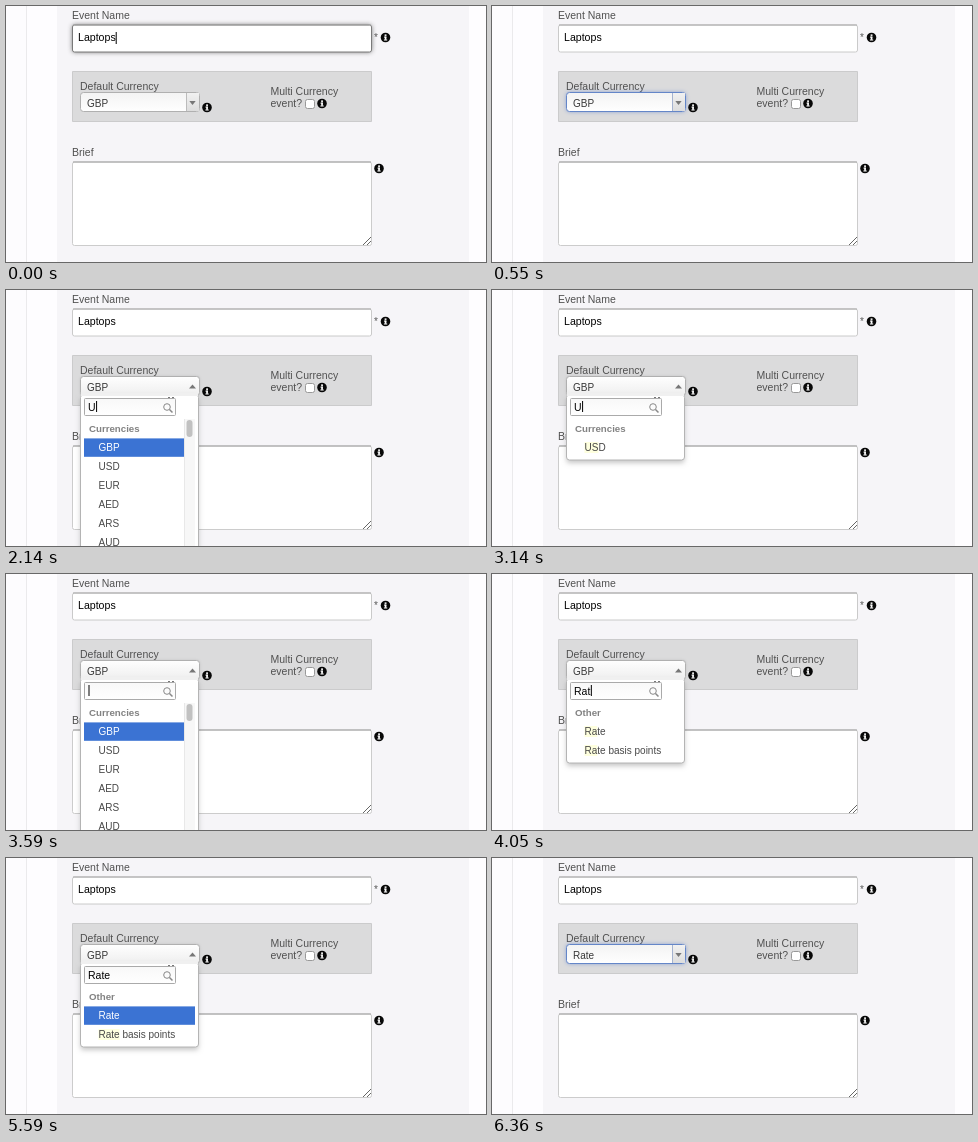
An HTML page with a canvas for the animation above (6.99 s loop, 480 by 256 pixels).

```html
<!DOCTYPE html>
<html lang="en">
<head>
<meta charset="utf-8">
<title>Currency picker</title>
<style>
  html, body { margin: 0; width: 100%; height: 100%; overflow: hidden; background: #fff; }
  canvas { display: block; width: 480px; height: 256px; }
</style>
</head>
<body>
<canvas id="stage"></canvas>
<script>
const LOOP = 6990, BLUR = 50, FADE = 250, OPEN = 590, PICK = 5200, CLOSE = 5690;
const BLINK = 540, CARET_REST = 4770, FILTER_DELAY = 45;
const FONT = '"Liberation Sans", Arial, sans-serif';

// Search box contents over time
const typing = [
  [OPEN, ''], [2140, 'U'], [2270, 'US'], [2400, 'USD'],
  [2910, 'US'], [3130, 'U'], [3320, ''],
  [3680, 'R'], [3860, 'Ra'], [4040, 'Rat'], [4230, 'Rate']
];
const groups = [
  ['Currencies', ['GBP', 'USD', 'EUR', 'AED', 'ARS', 'AUD', 'BGN', 'BRL', 'CAD', 'CHF', 'HUF', 'RUB', 'ZAR']],
  ['Other', ['Rate', 'Rate basis points']]
];

const canvas = document.getElementById('stage');
const ctx = canvas.getContext('2d');
const scale = window.devicePixelRatio || 1;
canvas.width = 480 * scale;
canvas.height = 256 * scale;

const typedAt = t => typing.filter(([at]) => at <= t).pop() || typing[0];

function rect(x, y, w, h, color) {
  ctx.fillStyle = color;
  ctx.fillRect(x, y, w, h);
}

function box(x, y, w, h, fill, border, radius = 2) {
  ctx.beginPath();
  ctx.roundRect(x + .5, y + .5, w - 1, h - 1, radius);
  ctx.fillStyle = fill;
  ctx.fill();
  ctx.shadowColor = 'transparent';
  ctx.strokeStyle = border;
  ctx.lineWidth = 1;
  ctx.stroke();
}

function glow(color, blur, dy = 0) {
  ctx.shadowColor = color;
  ctx.shadowBlur = blur * scale;
  ctx.shadowOffsetY = dy * scale;
}

function text(str, x, y, size = 10.5, color = '#505050', weight = '') {
  ctx.font = `${weight} ${size}px ${FONT}`;
  ctx.fillStyle = color;
  ctx.fillText(str, x, y);
  return ctx.measureText(str).width;
}

function polygon(points, color) {
  ctx.beginPath();
  points.forEach(([x, y]) => ctx.lineTo(x, y));
  ctx.fillStyle = color;
  ctx.fill();
}

function line(x1, y1, x2, y2, color, width = 1) {
  ctx.beginPath();
  ctx.moveTo(x1, y1);
  ctx.lineTo(x2, y2);
  ctx.strokeStyle = color;
  ctx.lineWidth = width;
  ctx.stroke();
}

function gradient(y, h, top, bottom) {
  const g = ctx.createLinearGradient(0, y, 0, y + h);
  g.addColorStop(0, top);
  g.addColorStop(1, bottom);
  return g;
}

function info(x, y) {
  ctx.beginPath();
  ctx.arc(x, y, 4.8, 0, 7);
  ctx.fillStyle = '#080808';
  ctx.fill();
  rect(x - .9, y - 3.1, 1.9, 1.5, '#fff');
  rect(x - 1.5, y - .9, 2.4, 1, '#fff');
  rect(x - .8, y - .9, 1.7, 3.2, '#fff');
  rect(x - 1.6, y + 2, 3.3, 1, '#fff');
}

function form(t) {
  rect(0, 0, 480, 256, '#fefdff');
  rect(0, 0, 20, 256, '#fdfcfe');
  rect(20, 0, 1, 256, '#ebeaec');
  rect(51, 0, 412, 256, '#f6f5f8');

  const focus = 1 - Math.min(1, Math.max(0, (t - BLUR) / FADE));
  const shade = Math.round(202 - 80 * focus);
  text('Event Name', 66, 13);
  glow(`rgba(60,60,60,${.75 * focus})`, 5);
  box(66, 18.5, 300, 28, '#fff', `rgb(${shade},${shade},${shade})`);
  rect(67, 18.5, 298, 1, '#a8a8a8');
  const width = text('Laptops', 72, 35, 10.6, '#000');
  if (t < BLUR) rect(72 + width, 26, 1, 12, '#000');
  text('*', 368, 35, 10, '#555');
  info(379.5, 31.5);

  box(66, 65, 300, 51, '#dbdbdc', '#cbcbcc', 0);
  text('Default Currency', 74, 84);
  text('Multi Currency', 264.5, 88.5);
  text('event?', 264.5, 101);
  box(299, 93, 10, 10, '#fff', '#999');
  info(316, 97.5);
  info(201, 101.5);

  text('Brief', 66, 150);
  box(66, 155.5, 300, 84.5, '#fff', '#ccc');
  rect(67, 155.5, 298, 1, '#a0a0a0');
  line(357, 239, 365, 231, '#666');
  line(361, 239, 365, 235, '#666');
  info(373, 162.5);
}

function select(t, open) {
  const focused = t >= BLUR && !open;
  if (focused) glow('rgba(70,110,200,.6)', 4);
  else if (open) glow('rgba(0,0,0,.15)', 3);
  box(74, 86, 120, 20, open ? gradient(86, 20, '#fff', '#eee') : gradient(86, 20, '#f3f3f3', '#fff'),
      focused ? '#6486c8' : '#b0b0b0', 3);
  text(t < CLOSE ? 'GBP' : 'Rate', 81, 101, 10, '#383838');
  if (open) {
    polygon([[183, 98.5], [190, 98.5], [186.5, 94.5]], '#777');
  } else {
    rect(181, 87, 12, 18, gradient(87, 18, '#f1f1f1', '#ddd'));
    rect(180, 87, 1, 18, focused ? '#a4b2cf' : '#bbb');
    polygon([[183.3, 95], [189.7, 95], [186.5, 99]], '#777');
  }
}

function matches(query) {
  const find = query.toLowerCase();
  return groups
    .map(([name, items]) => [name, items.filter(item => item.toLowerCase().includes(find))])
    .filter(([, items]) => items.length);
}

function dropdown(t) {
  const [since, value] = typedAt(t);
  const query = typedAt(t - FILTER_DELAY)[1];
  const found = matches(query);
  const rows = found.reduce((sum, [, items]) => sum + items.length + 1, 0);
  const scrolls = rows > 9;
  const bottom = Math.min(320, 132.5 + rows * 19);

  glow('rgba(0,0,0,.22)', 5, 3);
  box(74, 104, 119, bottom - 104, '#fff', '#b4b4b4', 3);
  rect(75, 103, 117, 3, '#f0f0f0');
  box(78, 108, 92, 18, gradient(108, 18, '#f8f8f8', '#fff'), '#aaa', 1);
  rect(162, 107, 2, 1, '#777');
  rect(166, 107, 2, 1, '#777');
  ctx.beginPath();
  ctx.arc(161, 117, 3.3, 0, 7);
  ctx.strokeStyle = '#888';
  ctx.lineWidth = 1;
  ctx.stroke();
  line(163.5, 119.5, 166.5, 122.5, '#888', 1.5);

  const width = text(value, 82, 121, 10.5, '#000');
  const blinkOn = Math.floor((t - since) / BLINK) % 2 === 0;
  if (blinkOn && t < CARET_REST) rect(82.5 + width, 111, 1, 11, '#000');

  let y = 129;
  for (const [name, items] of found) {
    text(name, 83, y + 12.6, 9.7, '#828282', 'bold');
    y += 19;
    for (const item of items) {
      const active = query === '' ? item === 'GBP' : item === 'Rate' && t >= PICK;
      if (active) rect(78, y + .4, (scrolls ? 178 : 189) - 78, 18.4, '#3b73d3');
      else if (query) markMatch(item, query, y);
      text(item, 92.5, y + 13, 10, active ? '#fff' : '#484848');
      y += 19;
    }
  }
  if (scrolls) {
    rect(179, 129, 10, 127, '#f7f7f7');
    rect(178, 129, 1, 127, '#e8e8e8');
    ctx.beginPath();
    ctx.roundRect(180.5, 130, 6, 17, 3);
    ctx.fillStyle = '#c1c1c1';
    ctx.fill();
  }
}

function markMatch(item, query, y) {
  const at = item.toLowerCase().indexOf(query.toLowerCase());
  ctx.font = `10px ${FONT}`;
  const x = 92.5 + ctx.measureText(item.slice(0, at)).width;
  rect(x, y + 4, ctx.measureText(item.slice(at, at + query.length)).width, 11, '#feffde');
}

function draw(now) {
  const t = now % LOOP;
  const open = t >= OPEN && t < CLOSE;
  ctx.setTransform(scale, 0, 0, scale, 0, 0);
  form(t);
  select(t, open);
  if (open) dropdown(t);
}

const start = performance.now();
function tick() {
  draw(performance.now() - start);
  requestAnimationFrame(tick);
}
tick();
</script>
</body>
</html>
```
